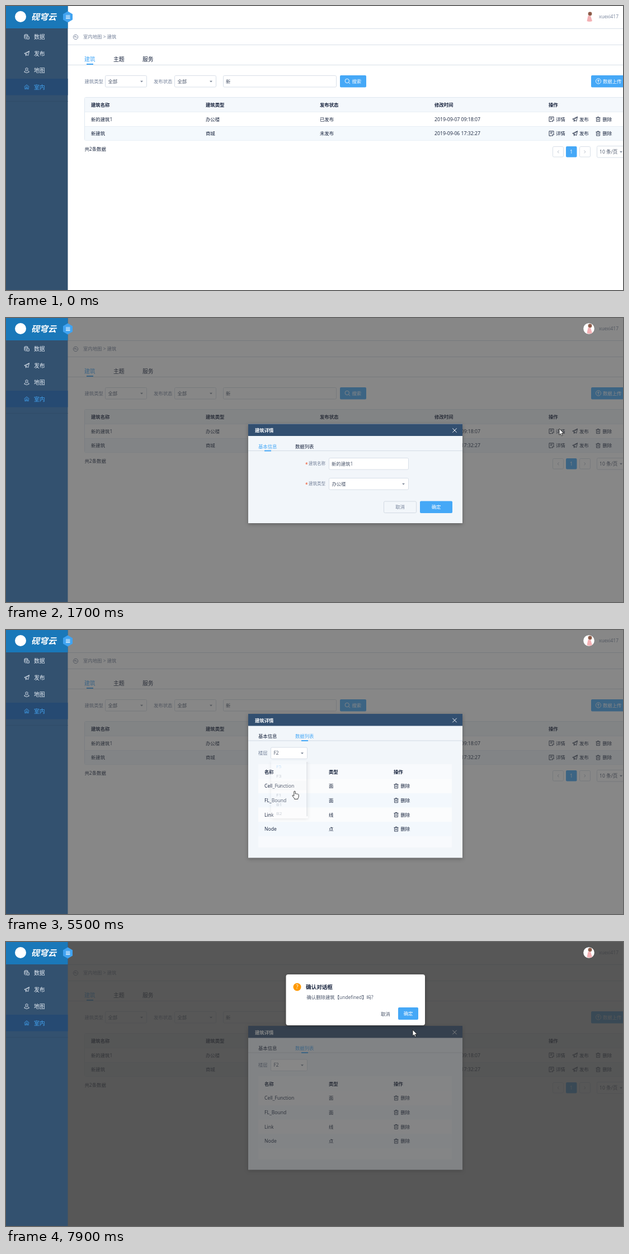
These frames come from a looping animation (1103 px wide and 508 px high, 8000 ms). An HTML page:

```html
<!DOCTYPE html>
<html lang="zh">
<head>
<meta charset="utf-8">
<style>
html, body { margin: 0; width: 100%; height: 100%; overflow: hidden; background: #fff; }
svg { display: block; width: 1103px; height: 508px; font-family: "Open Sans", "Noto Sans CJK SC", "Noto Sans CJK", sans-serif; }
text { white-space: pre; }
.shadow { filter: drop-shadow(0 2px 3px rgba(0,0,0,.28)); }
</style>
</head>
<body>
<svg id="stage" viewBox="0 0 1103 508"></svg>
<script>
const INK = '#17233d', GRAY = '#76839b', TEXT = '#4b566b', BLUE = '#45a8f7', NAVY = '#324f70', LINE = '#d8dfe8';
const BOLD = 'font-weight="700"', MID = 'text-anchor="middle"';

// Text is placed by its left edge and vertical centre.
const text = (x, cy, s, fill = INK, size = 8.4, extra = '') =>
  `<text x="${x}" y="${cy + size * .37}" font-size="${size}" fill="${fill}" ${extra}>${s}</text>`;
const rect = (x, y, w, h, fill, extra = '') =>
  `<rect x="${x}" y="${y}" width="${w}" height="${h}" fill="${fill}" ${extra}/>`;
const box = (x, y, w, h, fill = '#fff', stroke = LINE, extra = '') =>
  rect(x + .5, y + .5, w - 1, h - 1, fill, `stroke="${stroke}" rx="2" ${extra}`);
const hline = (x, y, w, fill = LINE) => rect(x, y, w, 1, fill);
const path = (d, extra) => `<path d="${d}" ${extra}/>`;
const caret = (x, y, extra = '') => path(`M${x - 2.5} ${y - 1.2}h5l-2.5 2.8z`, `fill="#7c8798" ${extra}`);
const select = (x, y, w, label, id = '') =>
  box(x, y, w, 21.5, '#fff', LINE, id && `id="${id}Box"`) +
  text(x + 5.5, y + 10.5, label, TEXT, 8.4, id && `id="${id}Label"`) +
  caret(x + w - 9.5, y + 11, id && `id="${id}Caret"`);
const button = (x, y, w, h, label) =>
  rect(x, y, w, h, BLUE, 'rx="2"') + text(x + w / 2, y + h / 2, label, '#fff', 8.4, MID);

const ICONS = {
  plane: 'M.8 4.8 9.5.8 7.6 8.6 4.6 6.6 3.6 9.2 3.2 5.8zM3.2 5.8 9.5.8',
  trash: 'M.5 2h9M3.5 2V.6h3V2M1.7 2v7.5h6.6V2M4 4v3.5M6 4v3.5',
  edit: 'M9 4.5V.8H1v8.4h4M3 3h4M3 5h3M6 9.3l.4-1.6 2.6-2.4 1 1-2.6 2.5z',
  data: 'M1 2c0-1.5 6-1.5 6 0s-6 1.5-6 0v5.5c0 1 2 1.3 3.5 1.2M7 2v2M1 4.7c0 1 2 1.2 3.5 1.1M5.3 5h4v4h-4z',
  pin: 'M5 6.5C1.5 3 3 .6 5 .6s3.5 2.4 0 5.9zM2.5 5.5.6 8l4.4 1.5L9.4 8 7.5 5.5M5 2.4v1',
  house: 'M.5 4.8 5 1l4.5 3.8M2 5.2v4M8 5.2v4M3.8 9.2V6.8h2.4v2.4M3.5 4.8h3',
  search: 'M8 4.5a3.7 3.7 0 1 1-7.4 0 3.7 3.7 0 0 1 7.4 0zM7 7.3l2.6 2.4',
  upload: 'M9.6 5A4.6 4.6 0 1 1 .4 5a4.6 4.6 0 0 1 9.2 0zM5 7.6V2.8M3 4.6l2-2 2 2',
  back: 'M9.2 5A4.2 4.2 0 1 1 .8 5a4.2 4.2 0 0 1 8.4 0zM4.4 3 2.8 4.4l1.6 1.4M2.8 4.4h3q1.4.2 1.2 2',
  close: 'M1.5 1.5l7 7M8.5 1.5l-7 7'
};
const icon = (name, cx, cy, color = INK, scale = 1) =>
  path(ICONS[name], `transform="translate(${cx - 5 * scale} ${cy - 5 * scale}) scale(${scale})" fill="none" stroke="${color}" stroke-width=".9"`);
const remove = (x, cy) => icon('trash', x + 4.5, cy, INK, .9) + text(x + 12.5, cy, '删除');

function sidebar() {
  const items = [['data', '数据'], ['plane', '发布'], ['pin', '地图'], ['house', '室内']];
  return rect(0, 0, 110.5, 508, '#33516f') + rect(0, 0, 110.5, 40, '#1a78b9') +
    '<circle cx="26" cy="19" r="10" fill="#fff"/>' +
    text(45, 19, '砚穹云', '#fff', 15, BOLD + ' font-style="italic"') +
    rect(0, 130, 110.5, 29.5, '#264a72') + hline(0, 170, 110.5, '#2f4b68') +
    items.map(([name, label], i) => {
      const color = i === 3 ? BLUE : '#e6edf5';
      return icon(name, 37, 55 + 30 * i, color) + text(50, 55 + 30 * i, label, color, 9.8);
    }).join('') +
    path('M110.5 9.5 119 14.5v10l-8.5 5-8.5-5v-10z', 'fill="#40a3f1"') +
    path('M107 17h7.5M107 19.7h7.5M107 22.4h7.5', 'stroke="#fff" stroke-width="1.2"');
}

function page() {
  const cols = [152, 357, 561, 766, 970];
  const rows = [
    ['新的建筑1', '办公楼', '已发布', '2019-09-07 09:18:07'],
    ['新建筑', '商城', '未发布', '2019-09-06 17:32:27']
  ];
  return text(1060, 19, 'xuexi417', GRAY) +
    hline(110, 40, 993) + icon('back', 124.5, 55.5, GRAY) + text(138, 55, '室内地图 &gt; 建筑', GRAY) +
    hline(110, 69, 993) + hline(110, 105, 993) + rect(144, 103, 12, 2, BLUE) +
    text(140, 95, '建筑', BLUE, 9.8) + text(192, 95, '主题', INK, 9.8) + text(244, 95, '服务', INK, 9.8) +
    text(140.5, 134.5, '建筑类型', GRAY) + select(177, 124, 75, '全部') +
    text(264, 134.5, '发布状态', GRAY) + select(301, 124, 75, '全部') +
    box(388, 124, 203, 21.5) + text(393, 134.5, '新', TEXT) +
    rect(597, 124, 47, 21.5, BLUE, 'rx="2"') + icon('search', 610.5, 134.5, '#fff') + text(618.5, 134.5, '搜索', '#fff') +
    rect(1046, 124, 66, 21.5, BLUE, 'rx="2"') + icon('upload', 1059, 134.5, '#fff') + text(1067, 134.5, '数据上传', '#fff') +
    box(140, 163, 980, 78, '#fff', '#dfe8f1') + rect(141, 164, 962, 25.5, '#f4f8fc') + rect(141, 215.5, 962, 25, '#f4f9fd') +
    hline(141, 189, 962, '#e8eef5') + hline(141, 215, 962, '#e8eef5') +
    ['建筑名称', '建筑类型', '发布状态', '修改时间', '操作'].map((s, i) => text(cols[i], 177, s, INK, 8.4, BOLD)).join('') +
    rows.map((row, r) => {
      const y = 202.5 + 25.5 * r;
      return row.map((s, i) => text(cols[i], y, s, INK, i === 3 ? 8.7 : 8.4)).join('') +
        icon('edit', 975, y) + text(983, y, '详情') +
        icon('plane', 1017, y) + text(1025, y, '发布') + remove(1054, y);
    }).join('') +
    text(140.5, 256, '共2条数据') +
    box(977, 251, 20, 19.5) + path('M988.5 258.5l-2.5 2.3 2.5 2.3', 'fill="none" stroke="#b4bcc8"') +
    button(1001, 251, 19.5, 19.5, '1') +
    box(1025, 251, 20, 19.5) + path('M1033.5 258.5l2.5 2.3-2.5 2.3', 'fill="none" stroke="#b4bcc8"') +
    box(1056, 250, 60, 21.5) + text(1061, 260.5, '10 条/页', TEXT, 8.6) + caret(1099.5, 261);
}

function floorTable(id, names, opX) {
  const kinds = ['面', '面', '线', '点', '点'];
  return `<g id="${id}">` +
    [['名称', 462], ['类型', 577], ['操作', opX]].map(([s, x]) => text(x, 253.5, s, INK, 8.4, BOLD)).join('') +
    names.map((s, i) => {
      const y = 279 + 25.7 * i;
      return rect(451, y - 12.8, 346, Math.min(25.7, 401.8 - y), i % 2 ? '#f3f8fd' : '#fbfcfd') +
        text(462, y, s, INK, 8.6) + text(577, y, kinds[i]) + remove(opX, y);
    }).join('') + (names.length > 4 ? rect(796, 266, 2, 119, '#b3bac2') : '') + '</g>';
}

function modal() {
  const field = (y, label) => text(535, y + 1.5, '*', '#ed4014', 8.4) + text(541, y, label, GRAY, 7.5);
  const layers = ['Cell_Function', 'FL_Bound', 'Link', 'Node', 'POI'];
  return `<clipPath id="clip"><rect x="433" y="199" width="383" height="208"/></clipPath>
    <g id="modal">${rect(433, 189.5, 383, 177.5, '#f2f6fa', 'id="body" class="shadow"')}
    <g id="head">${rect(433, 189.5, 383, 21.5, NAVY)}${text(445, 201, '建筑详情', '#fff', 8.4, BOLD)}${icon('close', 802, 201, '#fff', 1.05)}
      ${text(451, 229.5, '基本信息', BLUE, 8.4, 'id="tabInfo"')}${text(517, 229.5, '数据列表', INK, 8.4, 'id="tabList"')}
      ${hline(433, 237, 383, '#d3dce5')}${rect(462, 236.5, 12, 2, BLUE, 'id="ink"')}</g>
    <g clip-path="url(#clip)">
      <g id="info">${field(260, '建筑名称')}${box(577, 250, 143, 21.5)}${text(582, 260.8, '新的建筑1', TEXT)}
        ${field(296, '建筑类型')}${select(577, 286, 143, '办公楼')}
        ${box(675, 327.5, 59, 21.5, '#f2f6fa', '#d3dae3')}${text(704.5, 338.3, '取消', GRAY, 8.4, MID)}${button(740, 327.5, 58, 21.5, '确定')}</g>
      <g id="list">${text(451, 219.5, '楼层', GRAY)}${select(473, 209.5, 66, 'F5', 'floor')}
        ${rect(451, 240, 346, 149, '#f8fafd')}
        ${floorTable('tableFive', layers, 691)}${floorTable('tableTwo', layers.slice(0, 4), 693)}</g>
    </g>
    <g id="menu">${rect(474, 234, 66, 120.5, '#fff', 'class="shadow" rx="2"')}${rect(474, 295, 63, 20, '#f3f3f3', 'id="hover"')}
      ${['F5', 'F3', 'F2', 'F1', 'B1', 'B2'].map((s, i) => text(483, 246 + 19.75 * i, s, i ? TEXT : BLUE, 8.6)).join('')}
      ${rect(537, 236, 2.5, 114, '#b9bcc0')}</g></g>`;
}

const confirmBox = () => `<g id="confirm">${rect(500.5, 58, 248.5, 91, '#fff', 'rx="4" class="shadow"')}
  <circle cx="520.5" cy="80.5" r="7" fill="#f90"/>${text(520.5, 80.5, '?', '#fff', 10, MID)}
  ${text(536, 80, '确认对话框', INK, 9.6, BOLD)}${text(537.5, 99, '确认删除建筑【undefined】吗?', TEXT)}
  ${text(670, 129, '取消', TEXT)}${button(701, 117, 36, 22, '确定')}</g>`;

const avatar = `<circle cx="1042" cy="19" r="9.8" fill="#fff"/>
  <circle cx="1044" cy="14" r="3.4" fill="#8d5b48"/>${path('M1040.5 17.5h4.5l3 9.5q-5 2-9.5 0z', 'fill="#f4b0b4"')}`;
const cursors = path('M0 0v11.2l2.6-2.4 1.7 3.9 1.8-.8-1.7-3.8H8z', 'id="arrow" fill="#fff" stroke="#111" stroke-width=".8"') +
  path('M-1.2.8Q0-.6 1.2.8V5q1.3-.7 2 .3 1.3-.6 2 .4 1.4-.5 2 .8V10q-.3 2-1.4 3.2v1.3H-.4v-1.2L-4 8.8q-.2-1.6 1.3-1.2l1.5 1.3z', 'id="hand" fill="#fff" stroke="#111" stroke-width=".8"');

document.getElementById('stage').innerHTML = rect(0, 0, 1103, 508, '#fff') + page() +
  rect(110, 0, 993, 508, '#373737', 'id="mask"') + modal() +
  rect(110, 0, 993, 508, '#373737', 'id="mask2"') + confirmBox() + avatar + sidebar() + cursors;

const el = id => document.getElementById(id);
const set = (id, attrs) => { for (const k in attrs) el(id).setAttribute(k, attrs[k]); };
const show = (id, on) => set(id, { opacity: +on });
const ramp = (t, start, span) => Math.min(1, Math.max(0, (t - start) / span));
const smooth = p => p * p * (3 - 2 * p);
const zoom = (id, p, cx, cy) => {
  const s = .9 + .1 * p;
  set(id, { opacity: p, transform: `translate(${cx * (1 - s)} ${cy * (1 - s)}) scale(${s})` });
};

const route = [
  [300, 1055, 35], [400, 1050, 49], [1200, 989, 198], [1700, 989, 198], [2200, 555, 222], [2400, 545, 229],
  [3000, 545, 229], [3300, 526, 228], [3900, 526, 228], [4400, 517, 296], [4700, 517, 296], [4900, 516, 288],
  [5900, 516, 288], [6600, 662, 341], [6800, 692, 342], [7000, 713, 333], [7400, 713, 333], [7900, 727, 157]
];
function pointAt(t) {
  const i = Math.max(1, route.findIndex(k => k[0] >= t));
  const [t0, x0, y0] = route[i - 1], [t1, x1, y1] = route[i], p = ramp(t, t0, t1 - t0);
  return [x0 + (x1 - x0) * p, y0 + (y1 - y0) * p];
}

function draw(now) {
  const t = Math.floor(now % 8000 / 100) * 100;
  const list = t >= 2600, second = t >= 5400;

  set('mask', { opacity: .6 * ramp(t, 1383, 300) });
  zoom('modal', ramp(t, 1383, 200), 624.5, 278);
  set('mask2', { opacity: .6 * ramp(t, 7250, 300) });
  zoom('confirm', ramp(t, 7248, 200), 624.7, 103.5);

  const slide = smooth(ramp(t, 2510, 290));
  set('body', { y: list ? 150 : 189.5, height: list ? 257.5 : 177.5 });
  set('head', { transform: `translate(0 ${list ? -39.5 : 0})` });
  set('ink', { x: 462 + 66 * slide });
  set('tabInfo', { fill: list ? INK : BLUE });
  set('tabList', { fill: list ? BLUE : INK });
  set('info', { opacity: 1 - slide, transform: `translate(${-383 * slide} 0)` });
  set('list', { opacity: slide, transform: `translate(${383 * (1 - slide)} 0)` });

  const open = t >= 3600 && !second;
  const unfold = smooth(ramp(t, 3510, 290)) * (1 - smooth(ramp(t, 5310, 290)));
  set('menu', { opacity: unfold, transform: `translate(0 ${234 * .2 * (1 - unfold)}) scale(1 ${.8 + .2 * unfold})` });
  const [x, y] = pointAt(t);
  const row = Math.floor((y - 236) / 19.75);
  set('hover', { y: 236 + 19.75 * row, opacity: +(row >= 0) });
  set('floorBox', { stroke: open ? BLUE : LINE });
  set('floorCaret', { transform: open ? 'rotate(180 529.5 220.5)' : '' });
  el('floorLabel').textContent = second ? 'F2' : 'F5';
  show('tableFive', !second);
  show('tableTwo', second);

  const hand = [[1100, 1400], [2200, 2600], [3200, 7300]].some(([a, b]) => t >= a && t < b);
  show('hand', hand);
  show('arrow', !hand && t >= 400);
  for (const id of ['hand', 'arrow']) set(id, { transform: `translate(${x} ${y})` });
}

const start = performance.now();
(function tick() {
  draw(performance.now() - start);
  requestAnimationFrame(tick);
})();
</script>
</body>
</html>
```
